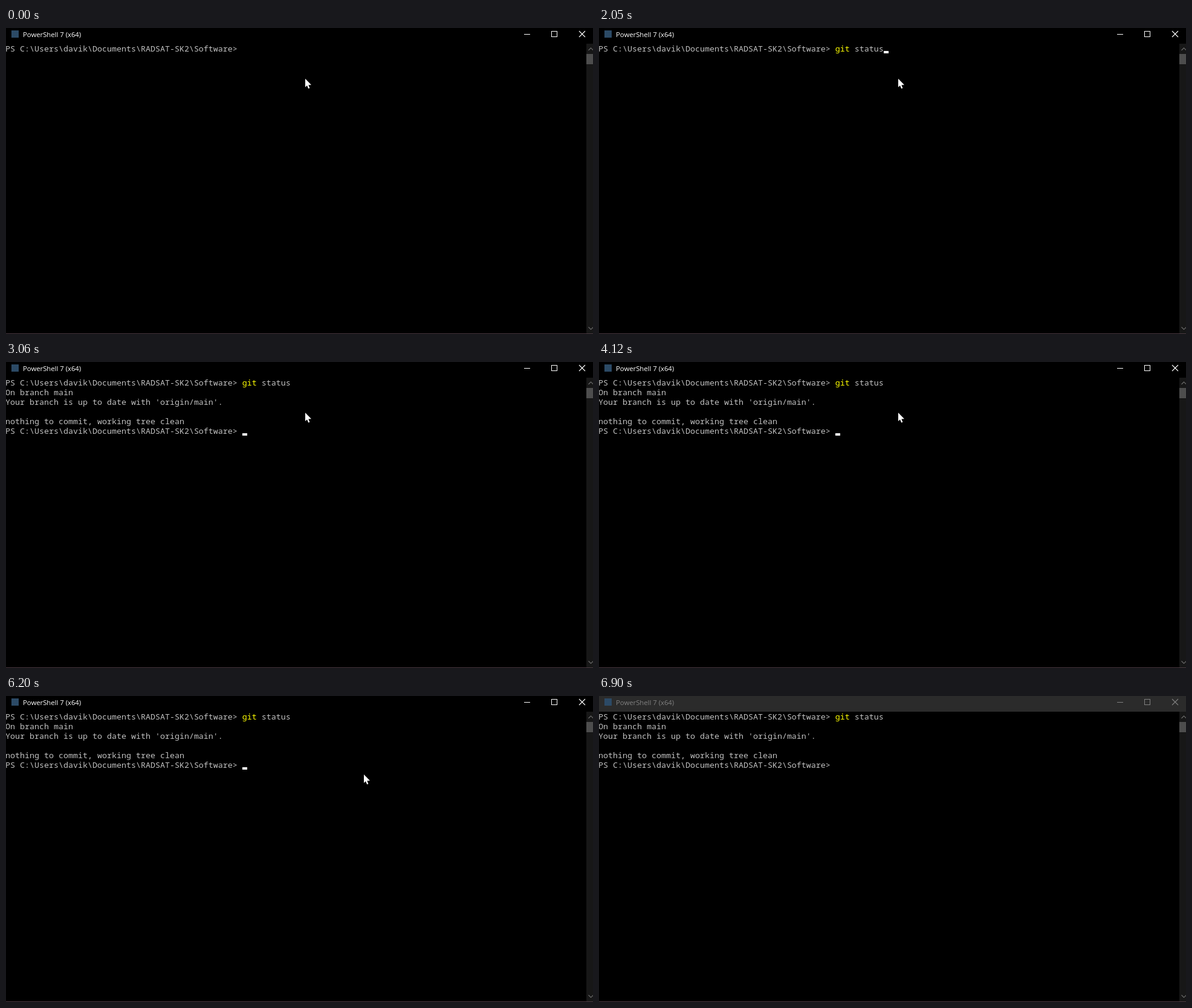
Animation of 971 by 507 pixels, one loop 6.92 s. Source, as an HTML page with a canvas:

```html
<!DOCTYPE html>
<html lang="en">
<head>
<meta charset="utf-8">
<title>Terminal</title>
<style>
  html, body { margin: 0; width: 100%; height: 100%; overflow: hidden; background: #000; }
  #stage { position: relative; width: 971px; height: 507px; overflow: hidden; background: #000; }
  canvas { position: absolute; left: 0; top: 0; }
  #title {
    position: absolute; left: 28px; top: 3px; white-space: pre;
    font: 11.3px/15px "Open Sans", sans-serif;
  }
  #screen {
    position: absolute; left: -1px; top: 26px; margin: 0;
    font: 13.333px/16px "Noto Sans Mono", monospace; color: #c0c0c0;
    font-variant-ligatures: none;
  }
  .cmd { color: #ff0; }
  .hint { color: #444; }
</style>
</head>
<body>
<div id="stage">
  <canvas id="back" width="971" height="507"></canvas>
  <div id="title">PowerShell 7 (x64)</div>
  <pre id="screen"><span id="prompt"></span><span id="cmd" class="cmd"></span><span id="args"></span><span id="hint" class="hint"></span><span id="output"></span></pre>
  <canvas id="front" width="971" height="507"></canvas>
</div>
<script>
const LOOP = 6920;
const PROMPT = "PS C:\\Users\\davik\\Documents\\RADSAT-SK2\\Software> ";
const COMMAND = "git status";
const OUTPUT = "\nOn branch main\nYour branch is up to date with 'origin/main'.\n\n" +
  "nothing to commit, working tree clean\n" + PROMPT;

// [time, characters typed]
const TYPING = [[0, 0], [990, 1], [1110, 2], [1260, 4], [1510, 5], [1660, 6],
  [1810, 7], [1930, 9], [2050, 10]];

// [time, caret column, caret row]; no column means hidden
const HOME = PROMPT.length;
const CARET = [[0], [430, HOME, 0], [990], [1110, HOME + 2, 0], [1260, HOME + 4, 0],
  [1510, HOME + 5, 0], [1660, HOME + 6, 0], [1810, HOME + 7, 0], [1930, HOME + 9, 0],
  [2050, HOME + 10, 0], [2510], [2910, 0, 1], [3060, HOME, 5], [3590],
  [4120, HOME, 5], [4680], [5140, HOME, 5], [5700], [6200, HOME, 5], [6780]];

// [time, x, y]; no position means hidden
const POINTER = [[0, 495, 84], [6200, 592, 130], [6350]];

const $ = id => document.getElementById(id);
const back = $("back").getContext("2d");
const front = $("front").getContext("2d");

const at = (track, t) => track.reduce((now, key) => key[0] <= t ? key : now);

function rect(ctx, color, x, y, w, h) {
  ctx.fillStyle = color;
  ctx.fillRect(x, y, w, h);
}

function line(color, ...points) {
  back.strokeStyle = color;
  back.lineWidth = 1.1;
  back.beginPath();
  points.forEach(([x, y]) => back.lineTo(x, y));
  back.stroke();
}

function drawTitleBar(active) {
  const ink = active ? "#fff" : "#808080";
  rect(back, active ? "#000" : "#2b2b2b", 0, 0, 971, 26);
  rect(back, "#2c4a66", 9, 4, 12, 12);
  rect(back, ink, 857, 10, 10, 1);
  back.strokeStyle = ink;
  back.lineWidth = 1;
  back.strokeRect(902.5, 5.5, 9, 9);
  line(ink, [948, 5], [958, 15]);
  line(ink, [958, 5], [948, 15]);
  $("title").style.color = ink;
}

function drawScrollBar() {
  rect(back, "#171717", 960, 26, 11, 480);
  rect(back, "#4d4d4d", 960, 43, 11, 17);
  line("#6c6c6c", [963.5, 37], [967.5, 33], [971.5, 37]);
  line("#6c6c6c", [963.5, 495.5], [967.5, 499.5], [971.5, 495.5]);
  rect(back, "#4a3a42", 0, 506, 971, 1);
}

function drawPointer(x, y) {
  const shape = [[0, 0], [0, 14], [3, 11.2], [5.2, 16.5], [7.4, 15.5], [5.3, 10.5], [10, 10.3]];
  front.beginPath();
  shape.forEach(([dx, dy]) => front.lineTo(x + dx, y + dy));
  front.closePath();
  front.fillStyle = "#fff";
  front.fill();
}

function setText(id, text) {
  if ($(id).textContent !== text) $(id).textContent = text;
}

function render(t) {
  const typed = at(TYPING, t)[1];
  setText("prompt", PROMPT);
  setText("cmd", COMMAND.slice(0, Math.min(typed, 3)));
  setText("args", COMMAND.slice(3, Math.max(typed, 3)));
  setText("hint", typed ? COMMAND.slice(typed) : "");
  setText("output", t >= 3060 ? OUTPUT : "");

  back.clearRect(0, 0, 971, 507);
  drawTitleBar(t < 6900);
  drawScrollBar();

  front.clearRect(0, 0, 971, 507);
  const [, col, row] = at(CARET, t);
  if (col !== undefined) rect(front, "#fff", col * 8 - 1, 38 + row * 16, 8, 4);
  const [, x, y] = at(POINTER, t);
  if (x !== undefined) drawPointer(x, y);
}

const start = performance.now();
function tick() {
  render((performance.now() - start) % LOOP);
  requestAnimationFrame(tick);
}
tick();
</script>
</body>
</html>
```
